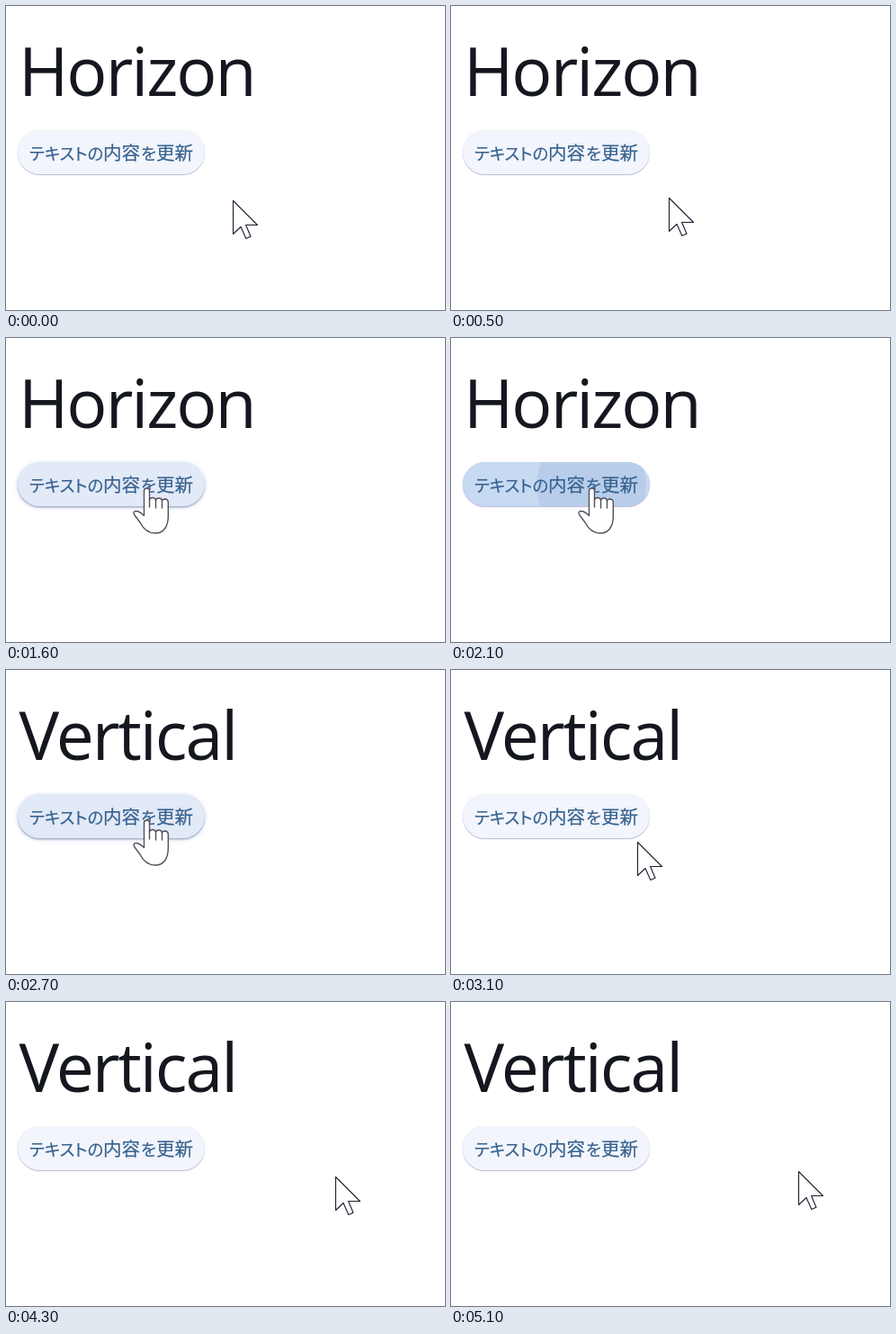
Animation, 488 px wide and 338 px high, one loop 5200 ms. Source, as an HTML page:

```html
<!DOCTYPE html>
<html lang="ja">
<head>
<meta charset="utf-8">
<title>Text update</title>
<style>
html, body { margin: 0; width: 100%; height: 100%; overflow: hidden; background: #fff; }
body { position: relative; }
.pill, .ripple, svg { position: absolute; }
svg { left: 0; top: 0; }
.pill, .ripple, .title, .cursor, .arrow, .hand { animation: 5200ms step-end infinite; }

.pill {
  left: 13px; top: 138px; width: 208px; height: 48.5px;
  border-radius: 25px; overflow: hidden;
  --rest: 0 1px 1px rgba(70, 70, 140, .36), 0 0 1px rgba(70, 80, 140, .14);
  --raised: 0 1.5px 1.5px rgba(60, 70, 120, .36), 0 1px 4px 1px rgba(120, 150, 220, .26);
  animation-name: pill;
}
@keyframes pill {
  0% { background: #f3f5fd; box-shadow: var(--rest); }
  13.46% { background: #e2e9f7; box-shadow: var(--raised); }
  36.53% { background: #d4e0f2; box-shadow: var(--raised); }
  38.46% { background: #c6daf1; box-shadow: var(--rest); }
  44.23% { background: #d0def2; box-shadow: var(--rest); }
  46.15% { background: #dae4f5; box-shadow: var(--raised); }
  48.07% { background: #e2e9f7; box-shadow: var(--raised); }
  59.61%, 100% { background: #f3f5fd; box-shadow: var(--rest); }
}

.ripple {
  left: 82px; top: -35px; width: 122px; height: 122px;
  border-radius: 50%; background: #3f5fb0;
  animation-name: ripple;
}
@keyframes ripple {
  0% { opacity: 0; transform: scale(0); }
  36.53% { opacity: .05; transform: scale(.15); }
  38.46% { opacity: .1; transform: scale(.5); }
  40.38% { opacity: .1; transform: scale(1); }
  42.3% { opacity: .1; transform: scale(1.8); }
  44.23% { opacity: .07; transform: scale(2.8); }
  46.15% { opacity: .03; transform: scale(2.8); }
  48.07%, 100% { opacity: 0; transform: scale(0); }
}

.title { font: 75px "Open Sans", "Noto Sans", sans-serif; letter-spacing: -2px; fill: #15171f; }
.before { animation-name: before; }
.after { animation-name: after; }
@keyframes before { 0% { visibility: visible; } 42.3%, 100% { visibility: hidden; } }
@keyframes after { 0% { visibility: hidden; } 42.3%, 100% { visibility: visible; } }

.label {
  font: 500 20.5px "Noto Sans CJK JP", "Noto Sans CJK", sans-serif;
  font-feature-settings: "palt";
  fill: #36618e; stroke: #36618e; stroke-width: .2;
}
.kana { font-size: 18.5px; }

.cursor { fill: #fff; stroke-linejoin: round; stroke-linecap: round; animation-name: travel; }
.arrow { stroke: #1c1c30; stroke-width: 1.1; animation-name: arrow; }
.hand { stroke: #50505c; stroke-width: 1.4; animation-name: hand; }
@keyframes arrow { 0% { visibility: visible; } 13.46% { visibility: hidden; } 59.61%, 100% { visibility: visible; } }
@keyframes hand { 0% { visibility: hidden; } 13.46% { visibility: visible; } 59.61%, 100% { visibility: hidden; } }
@keyframes travel {
  0% { transform: translate(252px, 216px); }
  3.84% { transform: translate(254px, 220px); }
  7.69% { transform: translate(251px, 219px); }
  9.61% { transform: translate(242px, 213px); }
  11.53% { transform: translate(222px, 204px); }
  13.46% { transform: translate(183px, 180px); }
  15.38% { transform: translate(161px, 170px); }
  17.3% { transform: translate(156px, 167px); }
  57.69% { transform: translate(165px, 175px); }
  59.61% { transform: translate(207px, 191px); }
  61.53% { transform: translate(282px, 197px); }
  63.46% { transform: translate(346px, 197px); }
  65.38% { transform: translate(371px, 196px); }
  67.3% { transform: translate(366px, 194px); }
  86.53% { transform: translate(372px, 196px); }
  88.46% { transform: translate(382px, 197px); }
  90.38% { transform: translate(387px, 193px); }
  92.3%, 100% { transform: translate(386px, 188px); }
}
</style>
</head>
<body>
<div class="pill"><div class="ripple"></div></div>
<svg width="488" height="338" viewBox="0 0 488 338">
  <text class="title before" x="14" y="100">Horizon</text>
  <text class="title after" x="14.5" y="100">Vertical</text>
  <text class="label" y="171"><tspan class="kana" x="26">テキストの</tspan><tspan x="108">内容</tspan><tspan class="kana" x="150">を</tspan><tspan x="167">更新</tspan></text>
  <g class="cursor">
    <path class="arrow" d="M.5 .5V37.5L9 29.5L14.8 42.5L20 40.3L14.6 27.5H27.5Z"/>
    <g class="hand">
      <path d="M-2.5 3Q-2.5 0 .5 0Q3.5 0 3.5 3V13Q4 10.5 7 10.5Q10 10.5 10.5 13.5Q11 11 14 11Q17 11 17.5 14Q18 12 21 12Q24.3 12.5 24.3 16V31C24.3 43 19 50 10 50C2 50-3 46-7 38L-13 30Q-15.5 26-12 25.5Q-8 25-2.5 30.5Z"/>
      <path fill="none" d="M3.5 13V21M10.5 13.5V22M17.5 14V22"/>
    </g>
  </g>
</svg>
</body>
</html>
```
